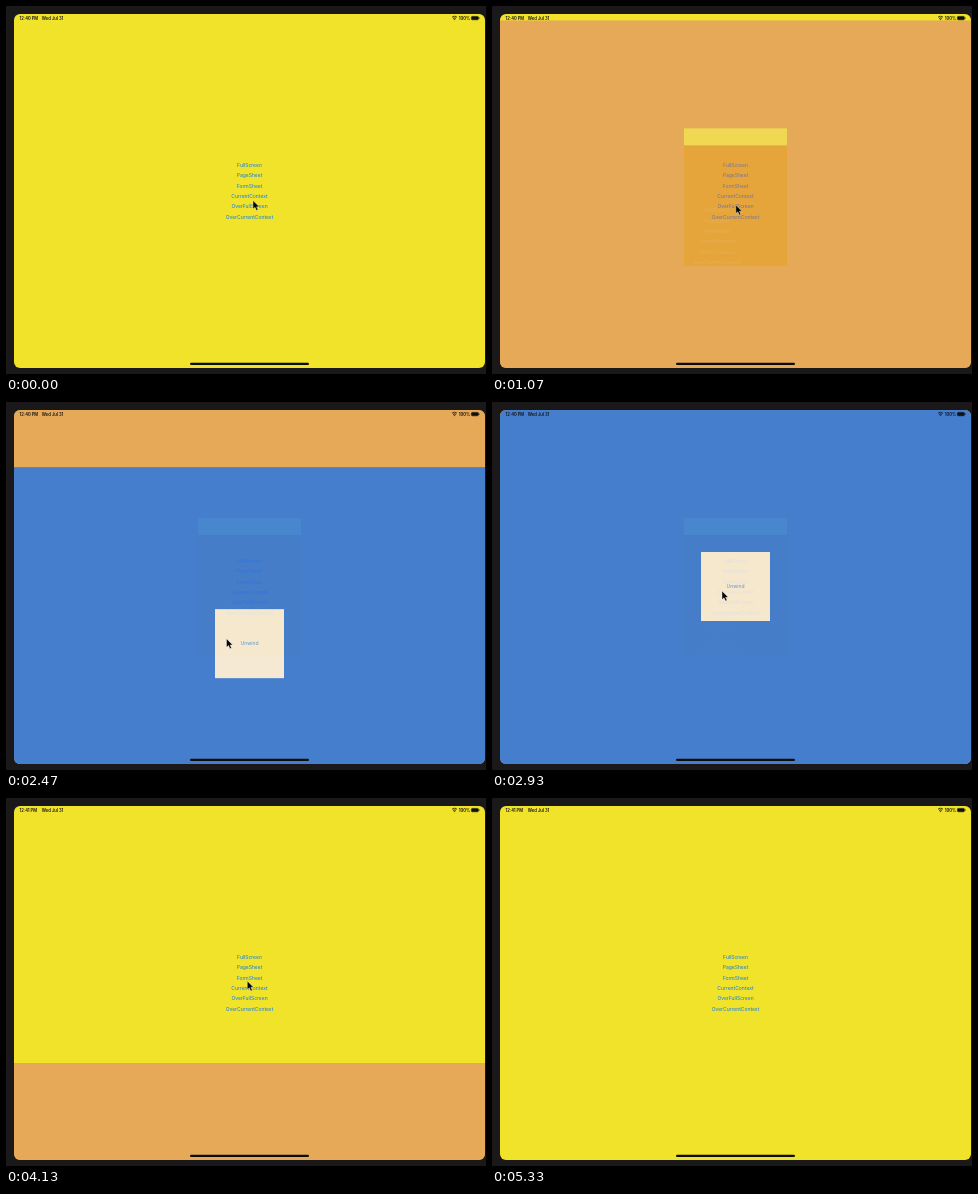
An HTML page that plays this animation: 480x368 px, repeating every 5.87 s.

```html
<!DOCTYPE html>
<html lang="en">
<head>
<meta charset="utf-8">
<title>Presentation styles</title>
<style>
  html, body { margin: 0; width: 100%; height: 100%; overflow: hidden; background: #1a1819; }
  svg { display: block; width: 100vw; height: 100vh; }
  text { font-family: Inter, Roboto, "Liberation Sans", sans-serif; font-size: 5px; }
  .status { font-size: 4.15px; font-weight: 600; fill: #111; }
  .menu { fill: #0a7af0; text-anchor: middle; }
  .list { fill: rgb(223,125,122); text-anchor: middle; }
</style>
</head>
<body>
<svg viewBox="0 0 480 368">
  <defs><clipPath id="screen"><rect x="8" y="8" width="471" height="354" rx="6"/></clipPath></defs>
  <rect width="480" height="368" fill="#1a1819"/>
  <g clip-path="url(#screen)">
    <rect x="8" y="8" width="471" height="354" fill="#f1e32a"/>
    <g id="menu" class="menu"></g>
    <g id="orange" opacity=".5">
      <rect x="8" y="8" width="471" height="354" fill="rgb(219,113,134)"/>
      <rect x="192" y="116" width="103" height="17.5" fill="rgb(239,205,122)"/>
      <rect x="192" y="133" width="103" height="120.5" fill="rgb(217,105,74)"/>
      <g id="list" class="list"></g>
    </g>
    <g id="blue" opacity=".8">
      <rect x="8" y="8" width="471" height="354" fill="rgb(30,116,237)"/>
      <rect x="209" y="150" width="69" height="69" fill="rgb(250,249,243)"/>
      <text id="unwind" class="menu" x="243.5" y="185.8">Unwind</text>
    </g>
  </g>
  <text id="clock" class="status" x="13.5" y="13.5"></text>
  <text class="status" x="35.8" y="13.5">Wed Jul 31</text>
  <text class="status" x="452.8" y="13.5">100%</text>
  <g fill="none" stroke="#111" stroke-width=".8">
    <path d="M446 11.2Q448.5 9.2 451 11.2M447 12.5Q448.5 11.3 450 12.5"/>
    <circle cx="448.5" cy="13.5" r=".3"/>
    <rect x="465.4" y="10.4" width="7" height="3.4" rx="1" fill="#111" stroke-width=".6"/>
    <path d="M473.4 11.4v1.4" stroke-width=".5"/>
  </g>
  <rect x="184" y="356.8" width="119" height="2.3" rx="1.15" fill="#0c0c08"/>
  <path id="cursor" d="M0 0V8.6L2 6.8L3.5 10L5 9.3L3.6 6.3H6.2Z" fill="#050505" stroke="#fff" stroke-opacity=".75" stroke-width=".5"/>
</svg>
<script>
const LOOP = 5870, STEP = 200 / 3, TRAVEL = 354;
const STYLES = ["FullScreen", "PageSheet", "FormSheet", "CurrentContext", "OverFullScreen", "OverCurrentContext"];
const $ = id => document.getElementById(id);

function addLabels(parent, x, top) {
  return STYLES.map((name, i) => {
    const label = document.createElementNS("http://www.w3.org/2000/svg", "text");
    label.setAttribute("x", x);
    label.setAttribute("y", top + i * 10.35 + 1.8);
    label.textContent = name;
    parent.append(label);
    return label;
  });
}
const menu = addLabels($("menu"), 243.5, 159);
const list = addLabels($("list"), 225, 198);

// time, x, y of the pointer tip
const PATH = [
  [0, 247, 194.5], [70, 247, 194.5], [270, 243.8, 199], [1270, 243.8, 199],
  [1740, 220, 237], [2470, 220.5, 236.7], [2930, 230, 189], [3060, 234, 187],
  [3130, 247, 186], [3260, 247, 186], [3330, 241.3, 183], [4600, 241.3, 183],
  [4990, 470, 2], [5000, 490, -20], [LOOP, 490, -20]
];

function pointerAt(t) {
  const i = Math.max(1, PATH.findIndex(p => p[0] >= t));
  const [t0, x0, y0] = PATH[i - 1], [t1, x1, y1] = PATH[i];
  const u = (t - t0) / (t1 - t0), e = u * u * (3 - 2 * u);
  return [x0 + (x1 - x0) * e, y0 + (y1 - y0) * e];
}

// Share of the sheet's travel still left, critically damped.
function remaining(ms) {
  const x = Math.max(0, ms) * 0.0075;
  return Math.max(0, 1.015 * (1 + x) * Math.exp(-x) - 0.015);
}

function place(sheet, offset) {
  sheet.setAttribute("transform", `translate(0 ${offset * TRAVEL})`);
  sheet.setAttribute("visibility", offset >= 1 ? "hidden" : "visible");
}

const within = (t, from, to) => t >= from && t < to;

function render(t) {
  const dismissed = t >= 4065;
  place($("orange"), dismissed ? 1 - remaining(t - 3795) : remaining(t - 369));
  place($("blue"), dismissed ? 1 : remaining(t - 2046));
  menu[4].setAttribute("opacity", within(t, 265, 735) ? 0.25 : 1);
  list[4].setAttribute("opacity", within(t, 1930, 2400) ? 0.25 : 1);
  $("unwind").setAttribute("opacity", t >= 3865 ? 0.1 : 0.8);
  $("clock").textContent = t < 3265 ? "12:40 PM" : "12:41 PM";
  $("cursor").setAttribute("transform", `translate(${pointerAt(t)})`);
}

const start = performance.now();
function tick() {
  const t = (performance.now() - start) % LOOP;
  const step = Math.floor((t + 3.4) / STEP);
  render(Math.min(LOOP, Math.round(step * STEP / 10) * 10));
  requestAnimationFrame(tick);
}
tick();
</script>
</body>
</html>
```
